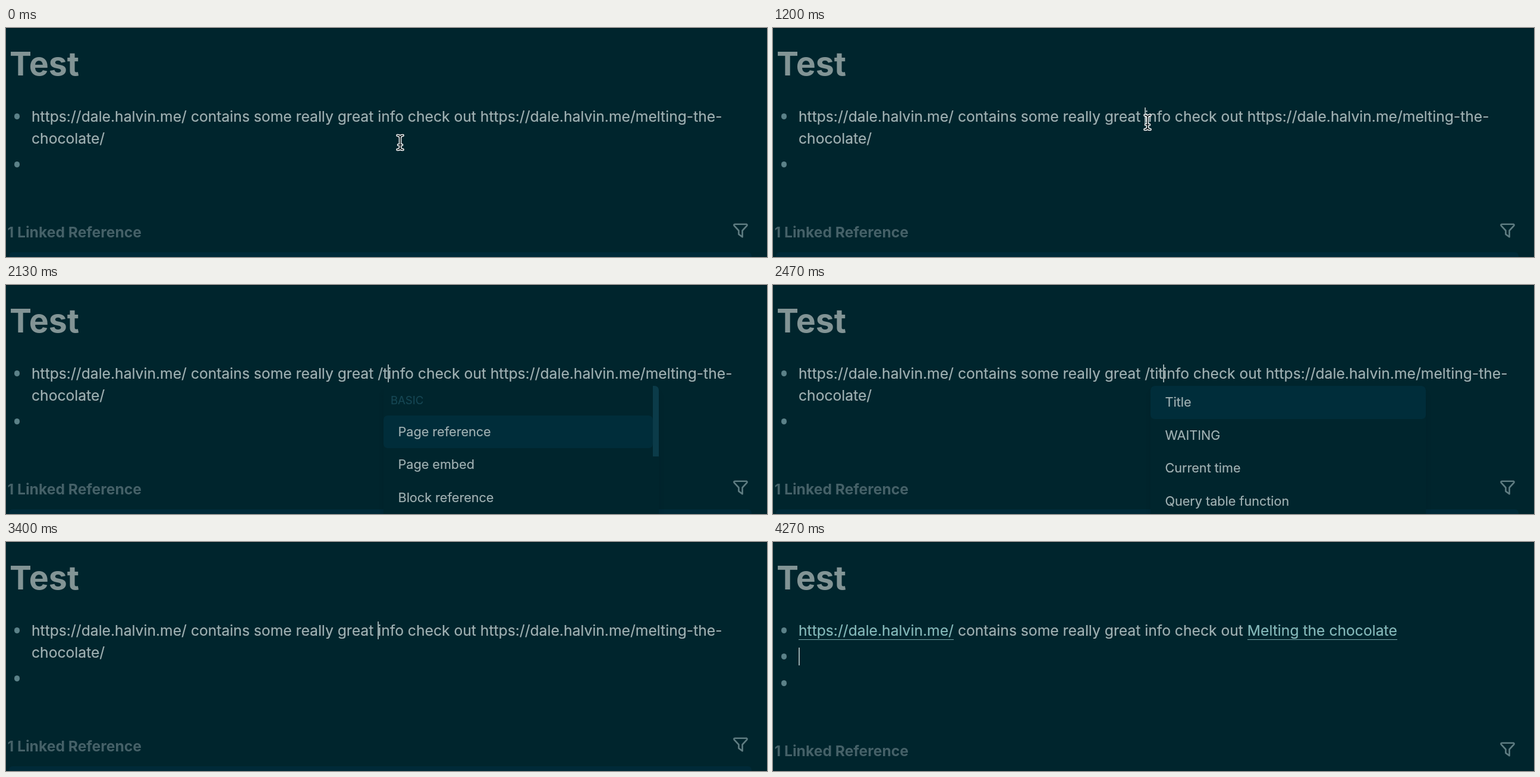
An HTML page for the animation above (6470 ms loop, 1280 by 386 pixels).

```html
<!DOCTYPE html>
<html lang="en">
<head>
<meta charset="utf-8">
<title>Title command</title>
<style>
html, body { margin: 0; width: 100%; height: 100%; overflow: hidden; background: #00252d; }
body {
  position: relative; color: #a0b1b3; white-space: pre;
  font: 24.67px/37px Inter, sans-serif; font-optical-sizing: none;
  -webkit-text-stroke: .2px;
}
div, svg { position: absolute; }
#edge { left: 0; top: 0; width: 100%; height: 1px; background: #001b22; }
h1 { position: absolute; margin: 0; left: 6px; top: 26px; font-size: 55.5px; line-height: 67px; font-weight: 700; color: #829495; -webkit-text-stroke: 0; }
#text { left: 43px; top: 130.5px; }
#dots { left: 0; top: 0; }
.dot { left: 13.8px; width: 9.4px; height: 9.4px; margin-top: -4.7px; border-radius: 50%; background: #5b8188; }
#text i { display: inline-block; width: 1.5px; height: 30px; margin-right: -1.5px; vertical-align: -6px; background: #98a9ab; }
u { text-decoration: none; color: #86babb; border-bottom: 1.5px solid #78a9ab; }
#refs { left: 0; top: 0; width: 1280px; height: 386px; }
#refs b { position: absolute; left: 2.5px; top: 326px; font-weight: 700; color: #456168; -webkit-text-stroke: 0; }
#strip { left: 5px; top: 378px; width: 1249px; height: 30px; border-radius: 6px; background: #002a38; }
#menu {
  left: 635px; top: 170px; width: 463px; transform-origin: 0 0; overflow: hidden;
  font-size: 21.6px; line-height: 55.5px; background: #00252d; border-radius: 7px;
  box-shadow: 0 10px 12px -6px #001b22;
}
#menu p { margin: 0; padding-left: 24.5px; height: 55.5px; }
#menu .on { background: #002d3a; border-radius: 7px; }
#menu .head { padding-left: 12px; height: 49.7px; font-size: 18.5px; line-height: 49px; color: #164754; }
#menu .head ~ .on { margin-right: 10px; }
#bar { right: 0; top: 0; width: 10px; height: 119px; background: #0b3b49; }
</style>
</head>
<body>
<div id="edge"></div>
<h1>Test</h1>
<div id="dots"></div>
<div id="text"></div>
<div id="refs"><b>1 Linked Reference</b><svg style="left:1216.5px;top:323px" width="37" height="37" viewBox="0 0 24 24" fill="none" stroke="#5f7d82" stroke-width="1.7" stroke-linejoin="round"><path d="M5.5 5h13a1 1 0 0 1 .5 1.5l-5 5.5v7l-4 -3v-4l-5 -5.5a1 1 0 0 1 .5 -1.5"/></svg><div id="strip"></div></div>
<div id="menu"></div>
<svg id="pointer" style="left:0;top:0" width="20" height="32" viewBox="-10 -16 20 32" fill="none" stroke-linecap="round"><defs><path id="beam" d="M-4.5 -12Q0 -12 0 -8V8Q0 12 -4.5 12M4.5 -12Q0 -12 0 -8M0 8Q0 12 4.5 12M-3 4H3"/></defs><use href="#beam" stroke="#fff" stroke-width="4.6"/><use href="#beam" stroke="#0a1518" stroke-width="1.7"/></svg>
<script>
const LOOP = 6470, CLICK = 570, OPEN = 1400, FILTER = 2270, RUN = 3270, DONE = 3470, ENTER = 4070;
const keys = [1350, 2130, 2270, 2330, 2870, 2930];
const command = '/title';
const site = 'https://dale.halvin.me/', page = 'Melting the chocolate';
const intro = ' contains some really great ', ask = 'info check out ';
const caret = '<i></i>';
const $ = id => document.getElementById(id);
const clamp = x => Math.min(1, Math.max(0, x));
const shown = {};

function put(id, html) {
  if (shown[id] !== html) $(id).innerHTML = shown[id] = html;
}

function textAt(t) {
  if (t >= ENTER) return `<u>${site}</u>${intro}${ask}<u>${page}</u>`;
  if (t >= DONE) return `${site}${intro}${ask}[${page}]\n(${site}melting-the-chocolate) ${caret}`;
  const typed = t < RUN ? command.slice(0, keys.filter(k => t >= k).length) : '';
  const end = typed.length > 4 ? 'melting-\nthe-chocolate/' : 'melting-the-\nchocolate/';
  return site + intro + typed + (t >= CLICK ? caret : '') + ask + site + end;
}

function menuAt(t) {
  const rows = list => list.map((s, i) => `<p${i ? '' : ' class="on"'}>${s}</p>`).join('');
  if (t < FILTER)
    return '<p class="head">BASIC</p>' + rows(['Page reference', 'Page embed', 'Block reference', 'Block embed']) + '<div id="bar"></div>';
  return rows(t < keys[4] ? ['Title', 'WAITING', 'Current time', 'Query table function'] : ['Title']);
}

function draw(now) {
  const t = now % LOOP, entered = t >= ENTER;
  put('text', textAt(t) + (entered ? `<div style="left:0;top:44.5px">${caret}</div>` : ''));
  put('dots', (entered ? [149, 193, 238] : [149, 230]).map(y => `<div class="dot" style="top:${y}px"></div>`).join(''));
  $('refs').style.top = entered ? '8px' : 0;

  const open = t >= OPEN && t < RUN, p = clamp((t - OPEN) / 100);
  $('menu').style.display = open ? 'block' : 'none';
  if (open) put('menu', menuAt(t));
  $('menu').style.opacity = p;
  $('menu').style.transform = `scale(${0.95 + 0.05 * p})`;

  const m = clamp((t - 270) / 200), e = m * m * (3 - 2 * m);
  $('pointer').style.display = t < keys[0] ? 'block' : 'none';
  $('pointer').style.transform = `translate(${653 - 33 * e}px, ${177 - 34 * e}px)`;
}

const start = performance.now();
(function tick() {
  draw(performance.now() - start);
  requestAnimationFrame(tick);
})();
</script>
</body>
</html>
```
